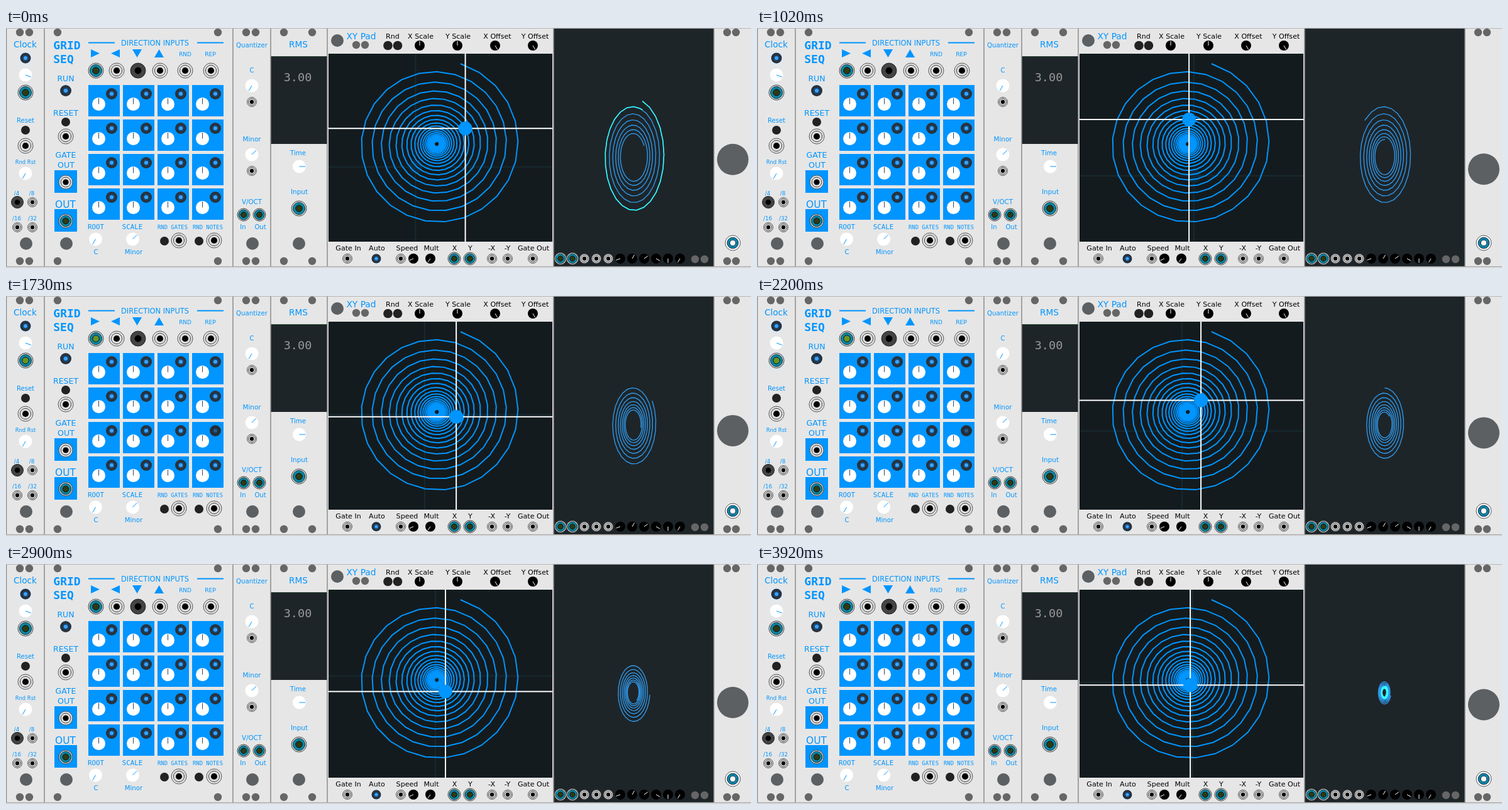
Write an HTML page that moves like this. It is 1185x383 px and loops after 4.02 s.

```html
<!DOCTYPE html>
<html lang="en">
<head>
<meta charset="utf-8">
<title>Modular rack with XY pad</title>
<style>
  html, body { margin: 0; width: 1185px; height: 383px; overflow: hidden; background: #e6e6e6; }
  svg { display: block; }
  text { font-family: "DejaVu Sans", sans-serif; text-anchor: middle; }
  .mono { font-family: "DejaVu Sans Mono", monospace; }
  .bold { font-weight: bold; }
</style>
</head>
<body>
<svg id="rack" width="1185" height="383" viewBox="0 0 1185 383"></svg>
<script>
const BLUE = '#0095ff', TEAL = '#0b88a6', INK = '#222', SCREEN = '#1e2529';
const parts = [];
const add = markup => parts.push(markup);

const rect = (x, y, w, h, fill) => add(`<rect x="${x}" y="${y}" width="${w}" height="${h}" fill="${fill}"/>`);
const circle = (x, y, r, fill, extra = '') => add(`<circle cx="${x}" cy="${y}" r="${r}" fill="${fill}" ${extra}/>`);
const line = (x1, y1, x2, y2, color, width = 1) =>
  add(`<line x1="${x1}" y1="${y1}" x2="${x2}" y2="${y2}" stroke="${color}" stroke-width="${width}"/>`);
const label = (text, x, y, size, color = BLUE, cls = '') =>
  add(`<text x="${x}" y="${y}" font-size="${size}" fill="${color}" class="${cls}">${text}</text>`);
const triangle = points => add(`<polygon points="${points}" fill="${BLUE}"/>`);

function knob(x, y, r, angle, face = '#fff', mark = BLUE) {
  const a = angle * Math.PI / 180;
  circle(x, y, r, face);
  line(x, y, x + Math.sin(a) * (r - 1), y - Math.cos(a) * (r - 1), mark);
}
function port(x, y, r = 12) {
  circle(x, y, r, '#e2e2e2', 'stroke="#555"');
  circle(x, y, r * .72, '#ddd', 'stroke="#444"');
  circle(x, y, r * .42, '#000');
}
function cabled(x, y, r = 12, cls = '') {
  circle(x, y, r, '#d5d5d5', 'stroke="#444"');
  circle(x, y, r * .8, TEAL, 'stroke="#10333d"');
  circle(x, y, r * .44, '#2f3a14', `stroke="#111" class="${cls}"`);
}
function plugged(x, y, r) {
  circle(x, y, r, '#444', 'stroke="#222"');
  circle(x, y, r * .45, '#000');
}
function led(x, y, r) {
  circle(x, y, r, '#2b3138');
  circle(x, y, r * .55, '#0c4c86');
  circle(x, y, r * .34, '#3fa2f5');
}
const glow = (x, y, r) => circle(x, y, r, 'url(#glow)');
const badges = (ys, ...xs) => ys.forEach(y => xs.forEach(x => circle(x, y, 6.2, '#666')));
const mark = (x, y, r, extra) => circle(x, y, r, '#5c6063', extra);

add(`<defs><radialGradient id="glow"><stop offset=".4" stop-color="#d9ebff"/>
  <stop offset="1" stop-color="#e6e6e6" stop-opacity="0"/></radialGradient>
  <clipPath id="pad"><rect x="513" y="41" width="356" height="300"/></clipPath></defs>`);

// Panels
rect(0, 0, 1185, 383, '#e6e6e6');
rect(871, 1, 255, 380, SCREEN);
rect(421, 45, 90, 140, SCREEN);
rect(513, 41, 356, 300, '#141b1e');
line(421, 45.5, 511, 45.5, '#24452f');
for (const x of [.5, 61, 361, 421, 511, 871, 1126]) line(x, 0, x, 381, '#8b8b8b', 1.5);
line(0, .5, 1185, .5, '#b5b5b5');
line(0, 381, 1185, 381, '#aaa', 1.5);
badges([7, 372], 22, 37, 82, 337, 382, 397, 442, 487, 1147, 1161);
badges([27], 557, 571);
badges([369], 1096, 1111);
[[32, 344], [96, 344], [392, 344], [466, 344], [527, 20]].forEach(([x, y]) => mark(x, y, 10));

// Clock
label('Clock', 30.5, 31, 13.6);
glow(31, 48, 17); led(31, 48, 8.5);
knob(31, 75, 10.5, 110);
glow(31, 103, 19); cabled(31, 103, 12, 'gate');
label('Reset', 31, 151, 10);
circle(31, 163, 7, INK);
port(31, 188);
label('Rnd Rst', 31, 217, 8.4);
knob(31, 232, 10.5, 210);
label('/4', 17, 267, 8.7); label('/8', 41, 267, 8.7);
label('/16', 17, 307, 8.7); label('/32', 42, 307, 8.7);
plugged(18, 278, 9.5);
port(42, 278, 7.5); port(18, 318, 7.5); port(42, 318, 7.5);

// Grid sequencer
label('GRID', 97, 34, 18, BLUE, 'mono bold');
label('SEQ', 91.5, 56, 18, BLUE, 'mono bold');
label('RUN', 95, 85, 12.5);
glow(95, 100, 15); led(95, 100, 9);
label('RESET', 95, 140, 12.5);
circle(95, 150, 7, INK);
port(95, 173);
label('GATE', 95, 207, 12.6); label('OUT', 95.5, 223, 12.6);
rect(77, 227, 36, 36, BLUE); port(95, 246, 11);
label('OUT', 94.5, 287, 15.4);
rect(77, 289, 36, 36, BLUE); cabled(95, 308, 11);
line(131, 23.5, 173, 23.5, BLUE, 2); line(304, 23.5, 346, 23.5, BLUE, 2);
label('DIRECTION INPUTS', 237, 28, 11.4);
triangle('135,34 135,47 149,40.5'); triangle('181,34 181,47 167,40.5');
triangle('201,34 216,34 208.5,47'); triangle('236,47 251,47 243.5,34');
label('RND', 285, 45, 8.9); label('REP', 325, 45, 9.2);
cabled(143, 68, 12, 'gate');
plugged(210, 68, 12);
[176, 245, 285, 326].forEach(x => port(x, 68));
for (let row = 0; row < 4; row++) for (let col = 0; col < 4; col++) {
  const x = 131 + 55 * col, y = 91 + 55 * row;
  rect(x, y, 50, 50, BLUE);
  knob(x + 16.5, y + 30.5, 10.5, 0, '#fff', '#345');
  led(x + 37, y + 14, 9);
}
circle(0, 0, 7, '#20262b', 'id="step"');
label('ROOT', 143, 321, 10.8, BLUE, 'mono'); label('SCALE', 201, 321, 10.8, BLUE, 'mono');
label('RND GATES', 265, 321, 8.9, BLUE, 'mono'); label('RND NOTES', 321, 321, 8.9, BLUE, 'mono');
knob(142.5, 337, 10.5, 210); knob(201.5, 337, 10.5, 45);
label('C', 143, 361, 10); label('Minor', 203, 361, 10.2);
circle(252, 340, 7, INK); port(275, 339);
circle(307, 340, 7, INK); port(331, 339);

// Quantizer
label('Quantizer', 391, 31, 10.2);
label('C', 391, 71, 10); knob(391, 92, 10.5, 210); port(391, 118, 7.5);
label('Minor', 391, 181, 10.4); knob(391, 202, 10.5, 45); port(391, 228, 7.5);
label('V/OCT', 391, 281, 10.3);
cabled(378, 298, 10); cabled(403, 298, 10);
label('In', 377, 321, 10); label('Out', 404.5, 321, 10);

// RMS
label('RMS', 465, 31, 13.7);
label('3.00', 464, 85, 18.5, '#999', 'mono');
label('Time', 464.5, 203, 10.2); knob(466.5, 221, 10.5, 90);
label('Input', 466.5, 265, 10.4); cabled(466, 288);

// XY pad frame
label('XY Pad', 565, 18, 13.8);
[['Rnd', 615], ['X Scale', 659.5], ['Y Scale', 719], ['X Offset', 781.5], ['Y Offset', 841.5]]
  .forEach(([text, x]) => label(text, x, 17, 11.1, '#000'));
circle(607.5, 28, 7.3, INK); circle(623, 28, 7.3, INK);
[[658, 0], [718, 0], [778, 150], [838, 150]].forEach(([x, a]) => knob(x, 28, 8, a, '#000', '#fff'));
[['Gate In', 544.5], ['Auto', 590], ['Speed', 638], ['Mult', 676.5], ['X', 713.5], ['Y', 738.5],
 ['-X', 772.5], ['-Y', 797.5], ['Gate Out', 839]].forEach(([text, x]) => label(text, x, 355, 11.1, '#000'));
[543, 628, 773, 798, 838].forEach(x => port(x, 368, 7.5));
glow(589, 368, 13); led(589, 368, 7.5);
knob(648, 368, 8, 245, '#000', '#fff'); knob(675, 368, 8, 215, '#000', '#fff');
cabled(713, 368, 10); cabled(738, 368, 10);

// Scope frame
cabled(882, 368, 9.5); cabled(901, 368, 9.5);
[920, 939, 958].forEach(x => port(x, 368, 7.5));
[250, 30, 55, 120, 180, 210].forEach((a, i) => knob(977 + 19 * i, 368, 8, a, '#000', '#fff'));

// Bouncing mark and its input
mark(1156, 0, 25, 'id="bouncer"');
circle(1156, 343, 12, '#fff', 'stroke="#555"');
circle(1156, 343, 8.8, TEAL, 'stroke="#124"');
circle(1156, 343, 4.8, '#fff', 'stroke="#124"');

// Spiral: the radius shrinks by a constant factor per turn
const STEP = .25 / (2 * Math.PI), TRAIL = 7.134;
function spiral(turn) {
  const r = 133.5 * .857 ** turn, a = 2 * Math.PI * (turn + 16.5 / 360);
  return [r * Math.sin(a), -r * Math.cos(a)];
}
function spiralPath(from, to, cx, cy, sx, sy) {
  if (to <= from) return '';
  const turns = [from];
  for (let k = Math.floor(from / STEP) + 1; k * STEP < to; k++) turns.push(k * STEP);
  turns.push(to);
  return 'M' + turns.map(turn => {
    const [x, y] = spiral(turn);
    return (cx + x * sx).toFixed(2) + ' ' + (cy + y * sy).toFixed(2);
  }).join('L');
}
const scopePath = (from, to) => spiralPath(from, to, 998, 205, .375, .69);
const cursor = (id, color, dot, extra = '') => add(`<g id="${id}" clip-path="url(#pad)" ${extra}>
  <path fill="none" stroke="${color}" stroke-width="2"/><circle r="11" fill="${dot}"/></g>`);

cursor('ghost', '#2b8f9f', BLUE, 'opacity=".13"');
add(`<path d="${spiralPath(0, 23, 685, 185, 1, 1)}" fill="none" stroke="${BLUE}" stroke-width="2"/>`);
cursor('cursor', '#fff', BLUE);
add('<path id="trail" fill="none" stroke="#2f97e8" stroke-width="1.4"/>');
add('<path id="overlap" fill="none" stroke="#3ff" stroke-width="1.5"/>');

const $ = id => document.getElementById(id);
$('rack').innerHTML = parts.join('');
const gates = document.querySelectorAll('.gate');

function setCursor(id, x, y) {
  const [cross, dot] = $(id).children;
  cross.setAttribute('d', `M${x} 41V341M513 ${y}H869`);
  dot.setAttribute('cx', x);
  dot.setAttribute('cy', y);
}

// The picture updates in discrete steps: [first ms, last ms, count]
const LOOP = 4020;
const starts = [0];
for (const [first, last, count] of [[60, 540, 5], [660, 1130, 5], [1250, 1730, 5], [1840, 2310, 5],
  [2430, 2900, 5], [3020, 3440, 5], [3560, 3920, 4]])
  for (let i = 0; i < count; i++)
    starts.push(Math.ceil((first + (last - first) * i / (count - 1)) / 10) * 10);

const bump = (n, center, width) => Math.max(0, 1 - Math.abs(n - center) / width);

function draw(now) {
  const ms = now % LOOP;
  const n = starts.findLastIndex(start => start <= ms);
  const t = starts[n] / 1000;
  const rush = Math.max(0, (t - 2.9) / 1.02);
  const turn = 6.125 + 1.802 * t + 4.19 * rush * rush;
  const [dx, dy] = spiral(turn);
  const x = 685 + dx, y = 185 + dy;

  setCursor('cursor', x, y);
  setCursor('ghost', 1382 - x, 382 - y);
  $('trail').setAttribute('d', scopePath(Math.max(0, turn - TRAIL), turn));
  $('overlap').setAttribute('d', turn > 14 ? scopePath(14, turn) : scopePath(0, TRAIL - turn));
  $('bouncer').setAttribute('cy', 226 - .357 * dx);

  const gate = bump(n, 4, 4) + .6 * Math.min(1, 1.4 * bump(n, 17, 7));
  const color = `rgb(${47 + 96 * gate},${58 + 150 * gate},${20 + 28 * gate})`;
  gates.forEach(el => el.setAttribute('fill', color));
  const row = n < 3 ? 1 : n < 9 ? 0 : 2;
  $('step').setAttribute('cx', 168 + 55 * (n % 4));
  $('step').setAttribute('cy', 105 + 55 * row);
  $('step').setAttribute('opacity', gate);
}

const begin = performance.now();
function tick() {
  draw(performance.now() - begin);
  requestAnimationFrame(tick);
}
tick();
</script>
</body>
</html>
```
